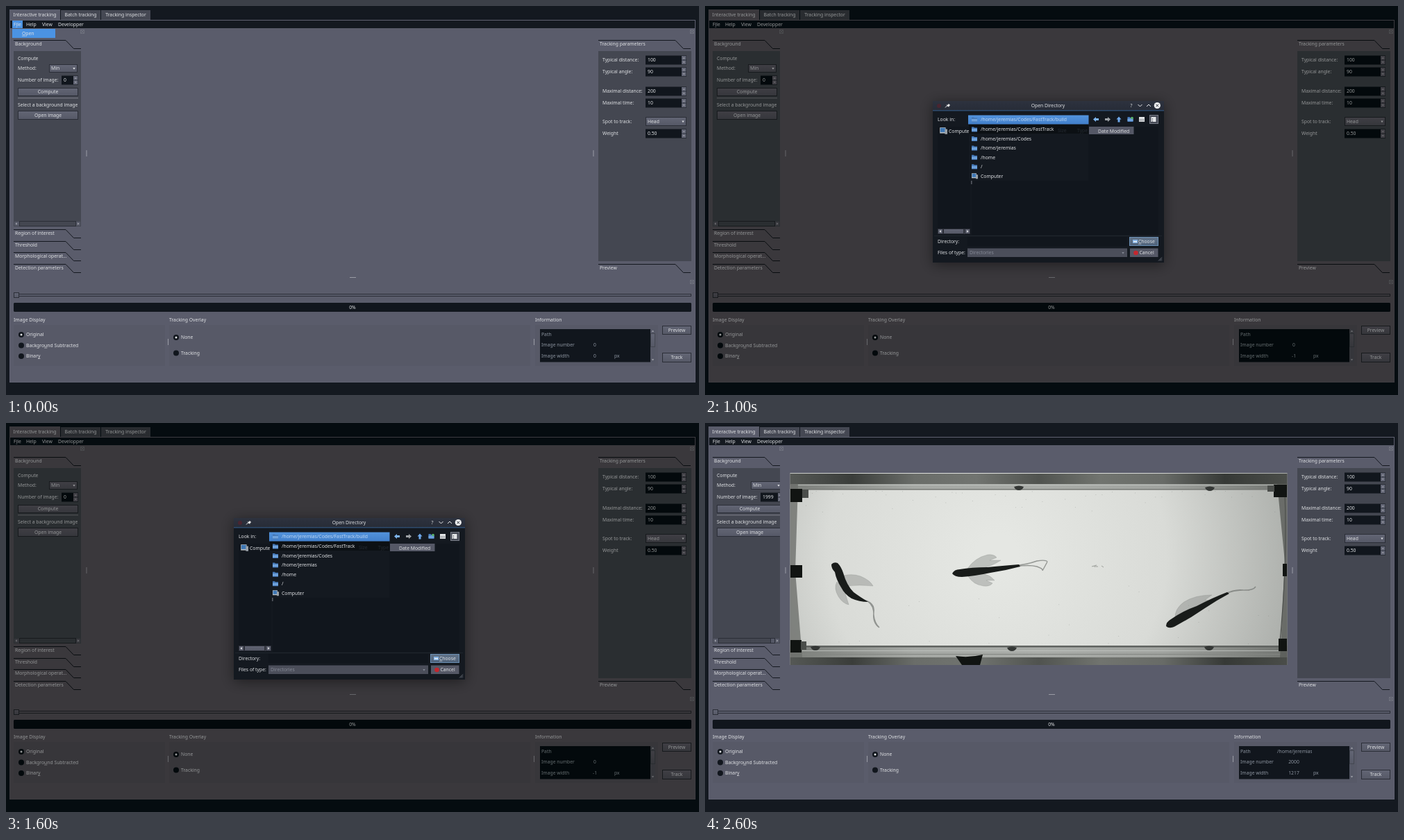
Animation of 998x561 px, one loop 3 s. Source, as an HTML page with a canvas:

```html
<!DOCTYPE html>
<html lang="en">
<head>
<meta charset="utf-8">
<title>Interactive tracking</title>
<style>
  html, body { margin: 0; width: 100%; height: 100%; overflow: hidden; background: #141920; }
  canvas { display: block; }
</style>
</head>
<body>
<canvas id="stage" width="998" height="561"></canvas>
<script>
const ctx = document.getElementById('stage').getContext('2d');
const HOME = '/home/jeremias';
const BRIGHT = {
  window: '#141920', bg: '#5a5c6b', panel: '#444751', tab: '#454853', group: '#575967', field: '#11161d',
  top: '#636675', bottom: '#555866', edge: '#2b2e37', line: '#14181f', rim: '#5f6170',
  text: '#dfe1e4', muted: '#8d95a0', mark: '#9a9ca5', faint: '#777a86'
};
const DIM = {
  window: '#050c10', bg: '#3a383c', panel: '#2a2e31', tab: '#292c30', group: '#37363a', field: '#03090c',
  top: '#403f45', bottom: '#35363b', edge: '#171a1d', line: '#080c0f', rim: '#3d3b40',
  text: '#949697', muted: '#656d70', mark: '#66676b', faint: '#525357'
};
let c = BRIGHT;

function rect(x, y, w, h, fill, stroke) {
  ctx.fillStyle = fill;
  ctx.fillRect(x, y, w, h);
  if (stroke) {
    ctx.strokeStyle = stroke;
    ctx.lineWidth = 1;
    ctx.strokeRect(x + .5, y + .5, w - 1, h - 1);
  }
}

function path(d, fill, stroke, width = 1) {
  const p = new Path2D(d);
  if (fill) { ctx.fillStyle = fill; ctx.fill(p); }
  if (stroke) { ctx.strokeStyle = stroke; ctx.lineWidth = width; ctx.stroke(p); }
}

function circle(x, y, r, fill) {
  ctx.fillStyle = fill;
  ctx.beginPath();
  ctx.arc(x, y, r, 0, 7);
  ctx.fill();
}

// Text is placed by its vertical middle; key is the index of the underlined letter.
function text(s, x, y, { color = c.text, align = 'left', key = -1 } = {}) {
  ctx.font = '6.8px "Noto Sans", sans-serif';
  const width = t => ctx.measureText(t).width;
  const left = align === 'center' ? x - width(s) / 2 : x;
  ctx.fillStyle = color;
  ctx.fillText(s, left, y + 2.4);
  if (key >= 0) ctx.fillRect(left + width(s.slice(0, key)), y + 3.3, width(s[key]), .6);
}

function clipped(x, y, w, h, draw) {
  ctx.save();
  ctx.beginPath();
  ctx.rect(x, y, w, h);
  ctx.clip();
  draw();
  ctx.restore();
}

function gradient(x0, y0, x1, y1, colors) {
  const g = ctx.createLinearGradient(x0, y0, x1, y1);
  colors.forEach((color, i) => g.addColorStop(i / (colors.length - 1), color));
  return g;
}

function raised(x, y, w, h, edge = c.edge) {
  rect(x, y, w, h, gradient(0, y, 0, y + h, [c.top, c.bottom]), edge);
}

function button(label, x, y, w, h = 13) {
  raised(x, y, w, h);
  text(label, x + w / 2, y + h / 2, { align: 'center' });
}

function arrow(x, y, dx, dy, color = c.mark, r = 1.7) {
  path(`M${x + dx * r} ${y + dy * r}L${x - dx - dy * r} ${y - dy - dx * r}L${x - dx + dy * r} ${y - dy + dx * r}Z`, color);
}

function combo(label, x, y, w, h = 13) {
  raised(x, y, w, h);
  text(label, x + 3, y + h / 2);
  arrow(x + w - 5, y + h / 2, 0, 1, c.text);
}

function spin(value, x, y, w) {
  rect(x, y, w, 13, c.field);
  rect(x + w - 7, y + .5, 6.5, 5.7, c.top);
  rect(x + w - 7, y + 6.8, 6.5, 5.7, c.top);
  arrow(x + w - 3.8, y + 3.6, 0, -1, c.mark, 1.4);
  arrow(x + w - 3.8, y + 9.5, 0, 1, c.mark, 1.4);
  text(value, x + 3, y + 6.5);
}

function sectionTitle(label, x, y, slope, right) {
  path(`M${x - 2} ${y - 5.5}H${slope}L${slope + 11.5} ${y + 6.5}H${right}`, null, c.line);
  text(label, x, y);
}

function radio(label, x, y, on, key) {
  circle(x, y, 4, c.field);
  if (on) circle(x, y, 1.5, c.text);
  text(label, x + 7, y, { key });
}

function dockIcon(x, y) {
  path(`M${x - 2.5} ${y - 2.5}h5v5h-5zl5 5m0 -5l-5 5`, null, c.faint, .7);
}

function tabsAndMenu(open) {
  [[5, 73, 'Interactive tracking'], [79, 57, 'Batch tracking'], [137, 71, 'Tracking inspector']].forEach(([x, w, label], i) => {
    const y = i ? 6 : 5;
    rect(x, y, w, 20 - y, i ? c.tab : c.bg);
    text(label, x + w / 2, 13, { align: 'center' });
  });
  rect(5, 20, 988, 523, c.bg, c.rim);
  rect(6, 21, 986, 11, c.window);
  if (open) {
    rect(9, 21, 15, 11, '#4b93e3');
    rect(9, 33, 62, 13, '#4b93e3');
    text('Open', 23, 39.5, { key: 0 });
  }
  text('File', 11, 26.5, { key: 1 });
  text('Help', 29, 26.5);
  text('View', 52, 26.5);
  text('Developper', 75, 26.5);
}

function leftDock(loaded) {
  const grow = loaded ? 8 : 0;
  sectionTitle('Background', 13, 55, 86, 108);
  rect(11, 65, 97, 253, c.panel);
  clipped(11, 65, 97, 245, () => {
    text('Compute', 17, 75.5);
    text('Method:', 17, 90);
    combo('Min', 62 + grow / 2, 84, 41 + grow / 2, 12);
    text('Number of image:', 17, 107);
    spin(loaded ? '1999' : '0', 80, 100.5, 24 + grow);
    button('Compute', 17, 118, 87 + grow, 12);
    rect(17, 132.5, 87 + grow, .7, c.mark);
    text('Select a background image', 17, 143);
    button('Open image', 17, 151, 87 + grow);
  });
  rect(11, 310, 97, 8, c.bottom, c.panel);
  rect(19, 310, loaded ? 76 : 82, 8, c.panel, c.edge);
  if (loaded) rect(94, 310, 7, 8, c.bottom, c.edge);
  arrow(15, 314, -1, 0);
  arrow(104, 314, 1, 0);
  ['Region of interest', 'Threshold', 'Morphological operat…', 'Detection parameters']
    .forEach((label, i) => sectionTitle(label, 13, 328 + Math.round(i * 16.6), 86, 108));
}

function rightDock() {
  sectionTitle('Tracking parameters', 855, 55, 964, 986);
  rect(853, 65, 134, 303, c.panel);
  [['Typical distance:', '100', 78], ['Typical angle:', '90', 95], ['Maximal distance:', '200', 123],
   ['Maximal time:', '10', 140], ['Spot to track:', 'Head', 167], ['Weight', '0.50', 184]].forEach(([label, value, y]) => {
    text(label, 859, y);
    if (value === 'Head') combo(value, 921, y - 7, 59);
    else spin(value, 921, y - 6.5, 59);
  });
  sectionTitle('Preview', 855, 378, 964, 986);
}

function bottomDock(imageCount, imageWidth, folder) {
  rect(11, 415, 976, 4, c.bg, c.edge);
  raised(11, 413, 8, 8);
  path('M12 428H986L987 429V440L986 441H12L11 440V429Z', c.field);
  text('0%', 499, 434.5, { align: 'center' });

  [['Image Display', 11, 218], ['Tracking Overlay', 235, 520], ['Information', 762, 177]].forEach(([label, x, w]) => {
    text(label, x, 453);
    rect(x, 460, w, 59, c.group);
  });
  radio('Original', 22, 474, true);
  radio('Background Subtracted', 22, 489.5, false, 7);
  radio('Binary', 22, 505, false, 5);
  radio('None', 245, 478, true);
  radio('Tracking', 245, 500.5, false);

  rect(769, 466, 159, 47.5, c.field);
  const color = c.muted;
  [['Path', '', 473.5], ['Image number', imageCount, 489], ['Image width', imageWidth, 504.5]].forEach(([label, value, y]) => {
    text(label, 771, y, { color });
    text(value, 848, y, { color, align: 'center' });
  });
  text('px', 876, 504.5, { color });
  clipped(822, 466, 52, 14, () => text(folder, 824, 473.5, { color }));
  rect(928, 466, 7, 47.5, c.bottom);
  raised(928, 472, 7, 20, c.panel);
  arrow(931.5, 469, 0, -1);
  arrow(931.5, 510, 0, 1);
  button('Preview', 945, 461, 42);
  button('Track', 945, 500, 42, 14);
}

function mainWindow({ open, loaded, imageCount, imageWidth, folder = '' }) {
  rect(0, 0, 998, 561, c.window);
  tabsAndMenu(open);
  leftDock(loaded);
  rightDock();
  bottomDock(imageCount, imageWidth, folder);
  [[110, 37], [988, 37], [988, 398]].forEach(p => dockIcon(...p));
  [[115.5, 208], [845.5, 208], [233, 480], [760, 480]].forEach(([x, y]) => rect(x, y, 1, 9, c.mark));
  rect(495, 391, 9, 1, c.mark);
}

function folderIcon(x, y) {
  path(`M${x - 4} ${y - 3.5}h3l1 1h4v6h-8z`, '#4679b8');
  rect(x - 4, y - 1, 8, 3.5, '#6fa2dc');
}

function computerIcon(x, y, s = 1) {
  rect(x - 4 * s, y - 4 * s, 7 * s, 7 * s, '#b9c0c6');
  rect(x - 3.4 * s, y - 3.4 * s, 5.8 * s, 5 * s, '#3f78b5');
  rect(x + 2 * s, y - 2 * s, 3 * s, 6 * s, '#9aa1a8');
}

function toolIcons() {
  path('M559 163.5l4-3.5v2h4v3h-4v2z', '#7db4ee');
  path('M584 163.5l-4-3.5v2h-4v3h4v2z', '#9da1a5');
  path('M596 159.5l3.5 4h-2v4h-3v-4h-2z', '#6fa9ec');
  folderIcon(612.5, 163.5);
  circle(615, 161.5, 1.8, '#58b368');
  rect(625, 160, 8, 7, '#e4e6e8');
  for (let i = 0; i < 6; i++) rect(626 + i % 3 * 2.3, 163 + (i > 2) * 2, 1.2, 1, '#454a52');
  rect(640, 157, 13, 13, '#454954', '#777b86');
  rect(642.5, 160, 7, 7, '#e4e6e8');
  for (let y = 162; y < 167; y += 2) rect(644, y, 1, 1, '#454a52');
}

function openDialog() {
  c = BRIGHT;
  ctx.save();
  ctx.shadowColor = '#0007';
  ctx.shadowBlur = 18;
  ctx.shadowOffsetY = 3;
  rect(328, 137, 333, 233, c.window);
  ctx.restore();

  rect(328, 137, 333, 14, gradient(0, 137, 0, 151, ['#2d323e', '#272c37']));
  rect(328, 150.5, 333, .8, '#386ca3');
  circle(337, 144, 3, '#4a2530');
  path('M346 146.5l2.5-2.5M348 142.5l3 3M349 143.5l2-2 1.5 1.5-2 2z', '#eee', '#eee');
  text('Open Directory', 494, 143.5, { align: 'center' });
  text('?', 614, 143.5, { align: 'center' });
  path('M623.5 142l3 3 3-3M636 145l3-3 3 3', null, '#e8eaec');
  circle(651.3, 143.5, 4.6, '#f0f1f2');
  path('M649.5 141.7l3.6 3.6m0-3.6l-3.6 3.6', null, '#252a34');

  text('Look in:', 335, 164);
  toolIcons();

  rect(335, 174, 47, 156, c.field);
  computerIcon(343, 180, 1.2);
  clipped(335, 174, 45, 14, () => text('Computer', 351, 180.5));
  rect(335, 321.5, 47, 7.5, c.panel);
  raised(343, 321, 30, 8);
  raised(335, 321, 8, 8);
  raised(374, 321, 8, 8);
  arrow(339, 325, -1, 0, c.text);
  arrow(378, 325, 1, 0, c.text);

  rect(384, 174, 269, 156, c.field);
  rect(553, 174, 64.5, 11, c.bottom);
  text('Date Modified', 566, 180.2);
  rect(383.5, 252, .8, 5, c.mark);
  rect(330, 331, 328, .7, '#242a32');

  rect(379, 157.5, 173.5, 13, gradient(0, 157, 0, 171, ['#5394dd', '#417fca']));
  folderIcon(388, 164);
  text(HOME + '/Codes/FastTrack/build', 397, 164, { color: '#bdd6f2' });
  rect(380, 171, 172, 81, '#141920');
  rect(380, 171, 172, 13, '#0c1014');
  text('Size', 508, 180, { color: '#252b33' });
  text('Type', 536, 180, { color: '#252b33' });
  [HOME + '/Codes/FastTrack', HOME + '/Codes', HOME, '/home', '/', 'Computer'].forEach((label, i) => {
    const y = 178 + i * 13.45;
    (i < 5 ? folderIcon : computerIcon)(388, y);
    text(label, 397, y);
  });

  text('Directory:', 335, 339.5);
  rect(378, 333, 230, 13, c.field);
  rect(611, 333, 42, 13, gradient(0, 333, 0, 346, ['#64758a', '#4d6078']), '#6a8fb4');
  rect(616, 337, 7, 5, '#86b4e6');
  rect(617, 339, 5, 1.5, '#f0f4f8');
  text('Choose', 624, 339.5, { key: 0 });
  text('Files of type:', 335, 356);
  rect(378, 349.5, 230, 12.5, '#4b4e5a');
  text('Directories', 381, 356, { color: '#858a96' });
  arrow(602, 356, 0, 1, '#858a96');
  rect(612, 349.5, 40.5, 12.5, c.bottom);
  circle(620.5, 356, 3.3, '#c4262e');
  text('Cancel', 625.5, 356);
  path('M653 367.5l5-5M655 367.5l3-3M657 367.5l1-1', null, '#858a96', .7);
}

function tank() {
  const x = 122.5, y = 72, w = 716, h = 277;
  const light = ctx.createRadialGradient(420, 190, 30, 420, 190, 460);
  light.addColorStop(0, '#e5e7e3');
  light.addColorStop(.5, '#d9dbd7');
  light.addColorStop(1, '#a5a8a4');
  rect(x, y, w, h, light);

  const across = colors => gradient(x, 0, x + w, 0, colors);
  const beam = across(['#555855', '#3a3d3a', '#6a6d69', '#717470', '#50534f', '#71746f', '#686b67', '#363936', '#4a4d49']);
  const rail = across(['#7b7e7a', '#a5a8a4', '#a9aca8', '#a0a39f', '#727571']);
  rect(x, 73, w, 16, beam);
  rect(x, 88, w, 8, rail);
  rect(133, 89, 690, .8, '#c4c7c3');
  rect(140, 95, 682, 1.6, '#777a76');
  rect(x, 321, w, 17, rail);
  rect(140, 321, 690, 2.5, '#606360');
  rect(140, 328, 690, .8, '#c4c7c3');
  rect(140, 333, 690, 1, '#828581');
  rect(x, 338, w, 11, beam);
  path('M122.5 88H134L130 214L140 338H122.5Z', '#6d706ccc');
  path('M838.5 88H824L835 200L828 338H838.5Z', '#595c58cc');
  path('M835 100Q839 205 827 325', null, '#4d504d', 1.2);

  ctx.filter = 'blur(0.5px)';
  [[123, 95, 17, 19], [123, 205, 17, 18], [123, 313, 16, 18], [819, 89, 19, 18], [832, 203, 6, 18], [826, 311, 12, 18]]
    .forEach(knob => rect(...knob, '#111412'));
  path('M140 96h9v12h-9zM138 315h8v12h-8zM810 90h10v9h-10z', '#4b4e4b');
  path('M361 336Q380 339 400 334L396 349H370Z', '#111412');
  [[452, 94], [727, 95], [159, 325], [442, 326], [726, 325]]
    .forEach(([sx, sy]) => path(`M${sx - 7} ${sy - 2}q7 -3 14 0q-2 5 -7 5q-5 0 -7 -5z`, '#343735'));
  ctx.filter = 'none';

  // Specks on the glass, spread by a fixed pseudo-random rule.
  for (let i = 1; i < 70; i++) {
    const u = i * .618034 % 1, v = i * i * .414214 % 1;
    rect(136 + u * 690, i % 3 ? 98 + v * v * 30 : 318 - v * v * 90, .8, .8, '#62656266');
  }
  path('M557 207l7-2M560 207h6M571 206l3 2', null, '#8b8e8a', .8);
}

function fish(fins, body, tail) {
  ctx.filter = 'blur(0.6px)';
  path(fins, '#85888468', '#777a7666', .6);
  path(tail, null, '#6d706caa', 1.4);
  path(body, '#191c1a');
  ctx.filter = 'none';
}

function video() {
  tank();
  fish('M200 220Q212 217 224 221Q238 227 242 235Q222 233 205 235ZM190 229Q185 238 192 250Q198 260 207 262Q203 250 200 238Z',
    'M182 204Q185 200 191 202Q196 207 199 216Q204 234 214 244Q222 250 235 258Q222 258 211 253Q201 247 196 237Q189 226 187 215Q182 210 182 204Z',
    'M228 255Q245 259 243 273Q241 288 251 295M235 258Q243 263 243 277Q244 288 251 295');
  fish('M378 210Q389 194 407 190Q416 189 420 194L410 198L426 198Q414 206 397 210ZM379 221Q386 233 401 235Q411 236 414 231L405 227L417 227Q410 219 400 217Z',
    'M356 217Q359 211 367 211Q384 208 407 208Q427 206 452 204L454 207Q432 213 411 216Q387 221 370 222Q359 222 356 217Z',
    'M445 206Q464 204 478 199Q491 197 493 200M448 207Q466 204 478 207Q487 210 486 213Q491 204 493 200');
  fish('M677 282Q676 268 690 258Q706 248 730 248L720 255L732 257Q712 267 692 285Z',
    'M664 293Q664 287 671 283Q688 271 708 264Q731 252 752 244L755 246Q738 255 720 267Q700 281 679 292Q669 298 664 293Z',
    'M747 247Q764 239 775 241Q789 242 793 236M748 247Q762 240 784 241');
}

const SCENES = [
  () => mainWindow({ open: true, imageCount: '0', imageWidth: '0' }),
  () => {
    c = DIM;
    mainWindow({ imageCount: '0', imageWidth: '-1' });
    openDialog();
  },
  () => {
    mainWindow({ loaded: true, imageCount: '2000', imageWidth: '1217', folder: HOME });
    video();
  }
];

let shown = -1;
function tick() {
  const scene = Math.floor(performance.now() / 1000) % SCENES.length;
  if (scene !== shown) {
    shown = scene;
    c = BRIGHT;
    SCENES[scene]();
  }
  requestAnimationFrame(tick);
}
tick();
</script>
</body>
</html>
```
